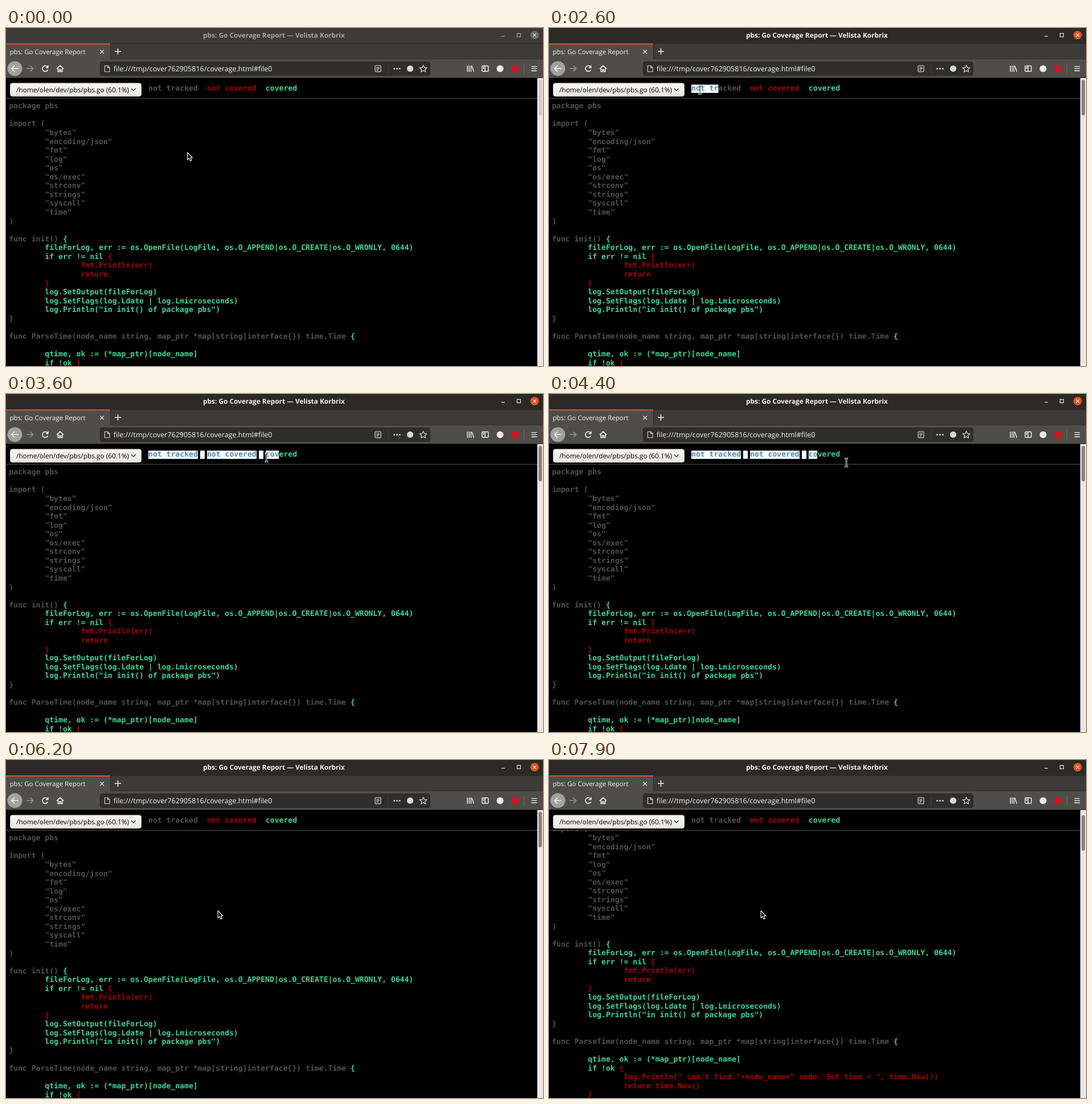
An HTML page for the animation above (8000 ms loop, 943 by 594 pixels).

```html
<!DOCTYPE html>
<html lang="en">
<head>
<meta charset="utf-8">
<title>Coverage report</title>
<style>
  html, body { margin: 0; width: 100%; height: 100%; overflow: hidden; background: #000; }
  #stage {
    position: absolute; left: 0; top: 0; width: 943px; height: 594px; overflow: hidden;
    background: #000; text-rendering: geometricPrecision;
    --bar: #3d3b38; --title: #a5a39f; --close: #686663; --thumb: #d0cecc;
  }
  #stage.focused { --bar: #2b2a27; --title: #f4f3f0; --close: #e2511f; --thumb: #858380; }
  #stage > * { position: absolute; }
  svg { left: 0; top: 0; }
  svg text { font-family: "Open Sans", "Noto Sans", sans-serif; }
  #code, .legend {
    margin: 0; font: bold 13.12px/15.57px "DejaVu Sans Mono", monospace;
    color: #505050; white-space: pre; tab-size: 8;
  }
  #page { left: 0; top: 124px; width: 933px; height: 470px; overflow: hidden; }
  #code { position: absolute; left: 5.2px; top: 6.3px; }
  .hit { color: #3cd898; }
  .miss { color: #a60000; }
  .legend { left: 250px; top: 99.4px; }
  .legend span { margin: 0 4.1px; }
  .legend span:first-child { margin-left: 0; }
  #picked { color: #4788c8; }
  #picked b { background: #fff; font-weight: inherit; }
</style>
</head>
<body>
<div id="stage">
  <div id="page"><pre id="code"></pre></div>

  <svg width="943" height="594" viewBox="0 0 943 594" fill="none">
    <defs>
      <linearGradient id="button" x2="0" y2="1">
        <stop stop-color="#f7f6f5"/><stop offset="1" stop-color="#e9e7e5"/>
      </linearGradient>
    </defs>

    <!-- title bar -->
    <path d="M0 0H943V28H0Z" fill="var(--bar)"/>
    <text x="470.5" y="17.3" font-size="11.85" font-weight="bold" text-anchor="middle"
      fill="var(--title)">pbs: Go Coverage Report — Velista Korbrix</text>
    <g stroke="var(--title)" stroke-width="1.1">
      <path d="M870 14.5H876"/>
      <rect x="897.5" y="9.5" width="6" height="6"/>
    </g>
    <circle cx="928.3" cy="12.5" r="7.6" fill="var(--close)"/>
    <path d="M925.5 9.7l5.6 5.6m0-5.6l-5.6 5.6" stroke="#f4f3f0" stroke-width="1.2"/>

    <!-- tabs -->
    <path d="M0 27H943V55H0Z" fill="#3d3b39"/>
    <path d="M183 27.5H943" stroke="#2c2b29"/>
    <path d="M0 27H183V55H0Z" fill="#4f4d4a"/>
    <path d="M0 27H183V29H0Z" fill="#dd4f24"/>
    <path d="M183.5 28V55M183 54.5H943" stroke="#302f2c"/>
    <text x="6.5" y="46" font-size="11.5" fill="#f2f1ee">pbs: Go Coverage Report</text>
    <path d="M165.3 38.5l6.6 6.6m0-6.6l-6.6 6.6" stroke="#e4e3e0" stroke-width="1.3"/>
    <path d="M191 41.3H202M196.5 35.8V46.8" stroke="#f2f1ee" stroke-width="1.5"/>

    <!-- toolbar -->
    <path d="M0 55H943V88H0Z" fill="#4f4d4a"/>
    <path d="M0 87.6H943" stroke="#282724"/>
    <circle cx="15.5" cy="71.3" r="13" fill="#a3a19f"/>
    <g stroke="#f4f3f0" stroke-width="1.6" stroke-linejoin="round" stroke-linecap="round">
      <path d="M21 71.3H10M14.6 66.5L9.8 71.3L14.6 76.1"/>
      <path d="M36.5 71.3H47.5M43 66.7L47.7 71.3L43 75.9" stroke="#94928f"/>
      <path d="M73.2 74A5 5 0 1 1 72.6 67.8"/>
      <path d="M74.2 66V70H70.2Z" fill="#f4f3f0" stroke-width=".8"/>
      <path d="M89.5 71.3L95 66L100.5 71.3M91.3 71.5V76.7H93.8V73.3H96.2V76.7H98.7V71.5"/>
    </g>
    <rect x="165.5" y="59.5" width="579" height="24" rx="3" fill="#2f2e2b" stroke="#262522"/>
    <path d="M173.3 66.2H178.8L182 69.4V76.8H173.3ZM178.6 66.4V69.6H181.8" stroke="#d8d7d4" stroke-width="1.1"/>
    <text x="188.8" y="76" font-size="12.5" fill="#f2f1ee">file:///tmp/cover762905816/coverage.html#file0</text>
    <g stroke="#d8d7d4" stroke-width="1.2">
      <rect x="648.2" y="66" width="10" height="10.8" rx="1.2"/>
      <path d="M650.4 69H656M650.4 71.4H656M650.4 73.8H654"/>
      <path d="M671.5 62V81" stroke="#3f3e3b" stroke-width="1"/>
      <path d="M732.8 65.4L734.6 69.4L739 69.9L735.7 72.8L736.7 77.1L732.8 74.9L728.9 77.1L729.9 72.8L726.6 69.9L731 69.4Z"/>
    </g>
    <path d="M681.8 71.4h0m4.8 0h0m4.8 0h0" stroke="#d8d7d4" stroke-width="3" stroke-linecap="round"/>
    <circle cx="709.7" cy="71.4" r="5.6" fill="#d8d7d4"/>
    <g stroke="#f2f1ee" stroke-width="1.4">
      <path d="M810.3 66V77M813.4 66V77M816.5 66V77M818 66.4L821.6 77"/>
      <rect x="836" y="66.5" width="11" height="9.8" rx="1.4"/>
      <path d="M841.3 66.5V76.3M837.7 69H839.8M837.7 71.3H839.8"/>
      <path d="M909.5 62V81" stroke="#6c6a67" stroke-width="1"/>
      <path d="M922.6 67.6H932.2M922.6 71.4H932.2M922.6 75.2H932.2"/>
    </g>
    <circle cx="867.6" cy="71.4" r="6" fill="#ecebe9"/>
    <circle cx="893.8" cy="71.4" r="6.5" fill="#d8121c"/>

    <!-- page header -->
    <path d="M0 88H933V124H0Z" fill="#000"/>
    <path d="M0 123.5H933" stroke="#505050"/>
    <rect x="7.5" y="97" width="230" height="23" rx="3.5" fill="url(#button)" stroke="#cfcac5"/>
    <text x="18" y="113" font-size="11.85" fill="#000">/home/olen/dev/pbs/pbs.go (60.1%)</text>
    <path d="M219.8 106.3L223.7 110.2L227.6 106.3" stroke="#33393b" stroke-width="1.5"/>

    <!-- scrollbar -->
    <path d="M933 88H943V594H933Z" fill="#e9e7e5"/>
    <rect id="thumb" x="935.2" y="91" width="6" height="62.5" rx="3" fill="var(--thumb)"/>
  </svg>

  <div class="legend"><span>not tracked</span> <span class="miss">not covered</span> <span class="hit">covered</span></div>
  <div class="legend" id="picked"><span><b>not tracked</b></span><b> </b><span><b>not covered</b></span><b> </b><span><b>covered</b></span></div>

  <svg width="943" height="594" viewBox="0 0 943 594">
    <path id="arrow" d="M.6 .8V13.6L3.6 10.9L5.7 15.6L8 14.6L5.9 10H9.4Z"
      fill="#000" stroke="#fff" stroke-width="1.1" stroke-linejoin="round"/>
    <g id="beam" fill="none">
      <path d="M-3 -7H3M0 -7V7M-3 7H3" stroke="#fff" stroke-width="2.6"/>
      <path d="M-2.6 -7H2.6M0 -7V7M-2.6 7H2.6" stroke="#111" stroke-width="1.1"/>
    </g>
  </svg>
</div>

<script>
// «…» marks covered code, ‹…› code that was not covered
const source = `package pbs

import (
	"bytes"
	"encoding/json"
	"fmt"
	"log"
	"os"
	"os/exec"
	"strconv"
	"strings"
	"syscall"
	"time"
)

func init() «{
	fileForLog, err := os.OpenFile(LogFile, os.O_APPEND|os.O_CREATE|os.O_WRONLY, 0644)
	if err != nil »‹{
		fmt.Println(err)
		return
	}›«
	log.SetOutput(fileForLog)
	log.SetFlags(log.Ldate | log.Lmicroseconds)
	log.Println("in init() of package pbs")»
}

func ParseTime(node_name string, map_ptr *map[string]interface{}) time.Time «{

	qtime, ok := (*map_ptr)[node_name]
	if !ok »‹{
		log.Println(" can't find "+node_name+" node. Set time = ", time.Now())
		return time.Now()
	}›`;

const $ = id => document.getElementById(id);
$('code').innerHTML = source
  .replace(/«/g, '<span class="hit">')
  .replace(/‹/g, '<span class="miss">')
  .replace(/[»›]/g, '</span>');

const LOOP = 8000, TICK = 100, GLIDE = 400;
const PRESS = 2400, RELEASE = 4600, DESELECT = 6200, SCROLL = 7700;
const LEFT = 250, CHAR = 7.9, LEGEND = 262;

// pointer stops: time of arrival, x, y
const stops = [
  [0, 318, 218], [600, 359, 212], [1800, 250.5, 150], [2200, 253, 109],
  [PRESS, 253, 109], [2500, 300, 109], [2700, 253.5, 109], [3000, 480, 112],
  [3200, 256, 109], [3400, 540, 121], [3600, 457.5, 112], [3800, 255, 109],
  [4500, 540, 121], [RELEASE, 512, 111], [5100, 512, 111], [5200, 493, 192],
  [5300, 426, 264], [5700, 371.5, 264]
];

const clamp = p => Math.min(1, Math.max(0, p));
const easeOut = p => 1 - (1 - p) ** 2;

// the pointer rests at each stop, then eases into the next one
function pointer(t) {
  const next = Math.max(1, stops.findIndex(stop => stop[0] >= t));
  const [t0, x0, y0] = t > stops.at(-1)[0] ? stops.at(-1) : stops[next - 1];
  const [t1, x1, y1] = t > stops.at(-1)[0] ? stops.at(-1) : stops[next];
  const p = easeOut(clamp(1 - (t1 - t) / (Math.min(GLIDE, t1 - t0) || 1)));
  return [x0 + (x1 - x0) * p, y0 + (y1 - y0) * p];
}

// the selection trails the pointer by one tick and snaps to characters
function selection(t) {
  if (t < PRESS || t >= DESELECT) return 0;
  const [x] = pointer(Math.min(t, RELEASE) - TICK);
  return Math.min(LEGEND, Math.round((x - LEFT) / CHAR) * CHAR);
}

function draw() {
  const now = performance.now() % LOOP;
  const t = now - now % TICK;
  const [x, y] = pointer(t);
  const width = selection(t);
  const scroll = 47.5 * clamp((t - SCROLL) / 200);
  const isBeam = t >= 2100 && t < RELEASE;

  $('stage').className = t >= PRESS ? 'focused' : '';
  $('arrow').style.display = isBeam ? 'none' : '';
  $('beam').style.display = isBeam ? '' : 'none';
  $(isBeam ? 'beam' : 'arrow').setAttribute('transform', `translate(${x} ${y})`);

  $('picked').style.clipPath = `polygon(0 0, ${width}px 0, ${width}px 100%, 0 100%)`;
  $('code').style.transform = `translateY(${-scroll}px)`;
  $('thumb').setAttribute('y', 91 + scroll / 8);
  requestAnimationFrame(draw);
}
draw();
</script>
</body>
</html>
```
